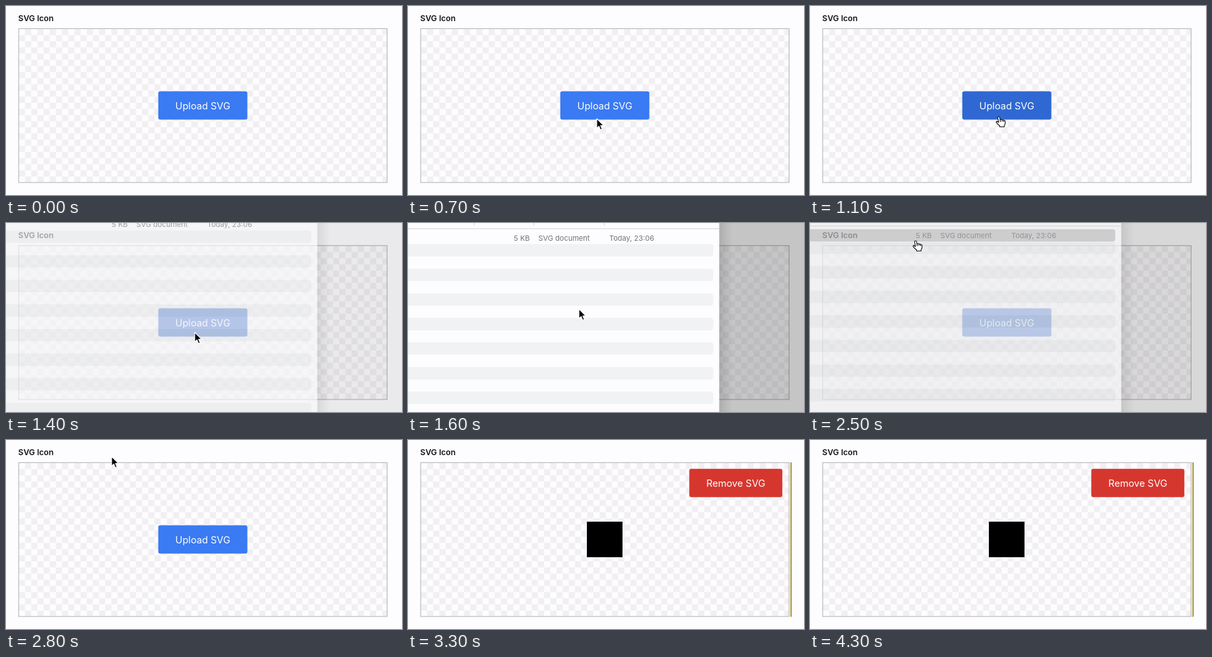
Animation of 600x287 px, one loop 4600 ms. Source, as an HTML page:

```html
<!DOCTYPE html>
<html lang="en">
<head>
<meta charset="utf-8">
<title>SVG upload</title>
<style>
  html, body { margin: 0; width: 100%; height: 100%; overflow: hidden; background: #fdfcfe; }
  svg { display: block; width: 600px; height: 287px; font-family: Inter, "Open Sans", sans-serif; }
  .label { font-size: 12.1px; font-weight: 600; fill: #121214; }
  .btn text { font-size: 14.6px; fill: #fff; text-anchor: middle; }
  #sheet text { font-size: 11px; fill: #737275; }
</style>
</head>
<body>
<svg viewBox="0 0 600 287">
  <defs>
    <pattern id="checks" x="19.6" y="34.9" width="18.667" height="18.667" patternUnits="userSpaceOnUse">
      <path d="M9.333 0h9.334v9.333H9.333zM0 9.333h9.333v9.334H0z" fill="#f1eff2"/>
    </pattern>
    <linearGradient id="shade">
      <stop offset="0" stop-opacity=".12"/>
      <stop offset="1" stop-opacity="0"/>
    </linearGradient>
  </defs>

  <rect width="600" height="287" fill="#fdfcfe"/>
  <text class="label" x="18.6" y="23">SVG Icon</text>
  <rect x="19.2" y="34.3" width="558.2" height="233.7" fill="url(#checks)" stroke="#b0afb1"/>

  <g id="upload" class="btn">
    <rect id="face" x="230.7" y="129.4" width="135" height="43" rx="3"/>
    <text x="298.2" y="156.8">Upload SVG</text>
  </g>

  <g id="done" class="btn">
    <rect x="271" y="124" width="54" height="54"/>
    <rect x="426.2" y="43.8" width="141" height="43" rx="3" fill="#d5372f"/>
    <text x="496.7" y="71">Remove SVG</text>
    <rect x="579.5" y="34" width="1.8" height="234.5" fill="#968722"/>
  </g>

  <rect id="dim" width="600" height="287"/>

  <g id="sheet">
    <rect x="471.5" y="-60" width="20" height="420" fill="url(#shade)"/>
    <rect y="-60" width="471.5" height="420" fill="#fdfcfe"/>
    <g id="stripes" fill="#f0f2f3"></g>
    <rect id="picked" x="-10" y="15.9" width="472.5" height="18.7" rx="4" fill="#c9c8ca"/>
    <path d="M0 11.2H471.5M100.3-9V6.5M190.5-9V6.5M297.5-9V6.5" stroke="#d4d3d6" fill="none"/>
    <text x="107" y="1.8">Size</text>
    <text x="197.5" y="1.8">Kind</text>
    <text x="305" y="1.8">Date Added</text>
    <text x="184.5" y="29" text-anchor="end">5 KB</text>
    <text x="197.5" y="29">SVG document</text>
    <text x="305" y="29">Today, 23:06</text>
  </g>

  <g id="cursor" stroke-linejoin="round">
    <path id="arrow" d="M0 0V14.6L3.3 11.5L5.7 17L8.1 16L5.8 10.6H10.4Z" stroke="#fff" stroke-width="1.1"/>
    <path id="hand" d="M-1.5 3.5Q-1.5 2 0 2Q1.3 2 1.5 3.5L2.2 8V6.8Q3.9 5.6 5 7.2Q6.7 6.2 7.6 7.9Q9.6 7.3 9.8 9.4V12Q9.7 14 8.3 15.3V17.5H1.5V16Q-1 14.3-3.6 10.9Q-4.2 9.4-2.8 9.1Q-1.7 9.1-.2 10.8ZM2.3 8V10M5 7.5V9.8M7.6 8.2V10" fill="#fff" stroke="#111" stroke-width="1.1"/>
  </g>
</svg>
<script>
const LOOP = 4600, STEP = 100;
const $ = id => document.getElementById(id);
const show = (id, on) => $(id).setAttribute("visibility", on ? "visible" : "hidden");

for (let i = 0; i < 8; i++) {
  const r = document.createElementNS("http://www.w3.org/2000/svg", "rect");
  const box = { x: -10, y: 34.6 + i * 37.333, width: 472.5, height: 18.67, rx: 4 };
  for (const k in box) r.setAttribute(k, box[k]);
  $("stripes").append(r);
}

// time, x, y
const path = [
  [100, 324, 227], [200, 306, 203], [300, 273, 164], [400, 249, 146],
  [500, 260, 168], [600, 279, 183], [700, 286, 171], [800, 286, 166],
  [1500, 286, 166], [1700, 232, 95], [1900, 172, 29], [2100, 160, 25],
  [2800, 160, 25], [3000, 203, 173]
];
// time, opacity, offset, dimming
const fade = [
  [1300, 0, -38, 0], [1400, .65, -23, .075], [1500, .93, -9, .17], [1600, 1, -2.5, .22],
  [1700, 1, 0, .23], [2400, 1, 0, .23], [2500, .68, -6.5, .145], [2600, .25, -15, .06],
  [2700, 0, -23, 0]
];

function at(keys, t) {
  if (t <= keys[0][0]) return keys[0].slice(1);
  for (let i = 1; i < keys.length; i++) {
    const a = keys[i - 1], b = keys[i];
    if (t <= b[0]) {
      const p = (t - a[0]) / (b[0] - a[0]);
      return a.slice(1).map((v, j) => v + (b[j + 1] - v) * p);
    }
  }
  return keys[keys.length - 1].slice(1);
}

const within = (t, a, b) => t >= a && t < b;

function draw(t) {
  const [x, y] = at(path, t);
  const [alpha, dy, dark] = at(fade, t);
  const visible = within(t, 100, 3100);
  const pointing = within(t, 800, 1400) || within(t, 2200, 2700);

  show("upload", t < 3000);
  show("done", t >= 3000);
  $("face").setAttribute("fill", within(t, 800, 2700) ? "#2f68d2" : "#3a7af2");

  $("dim").setAttribute("opacity", dark);
  $("sheet").setAttribute("opacity", alpha);
  $("sheet").setAttribute("transform", `translate(0 ${dy})`);
  show("picked", within(t, 2200, 2800));

  $("cursor").setAttribute("transform", `translate(${x} ${y})`);
  show("arrow", visible && !pointing);
  show("hand", visible && pointing);
}

const start = performance.now();
function tick() {
  const t = (performance.now() - start) % LOOP;
  draw(Math.floor(t / STEP) * STEP);
  requestAnimationFrame(tick);
}
draw(0);
requestAnimationFrame(tick);
</script>
</body>
</html>
```
